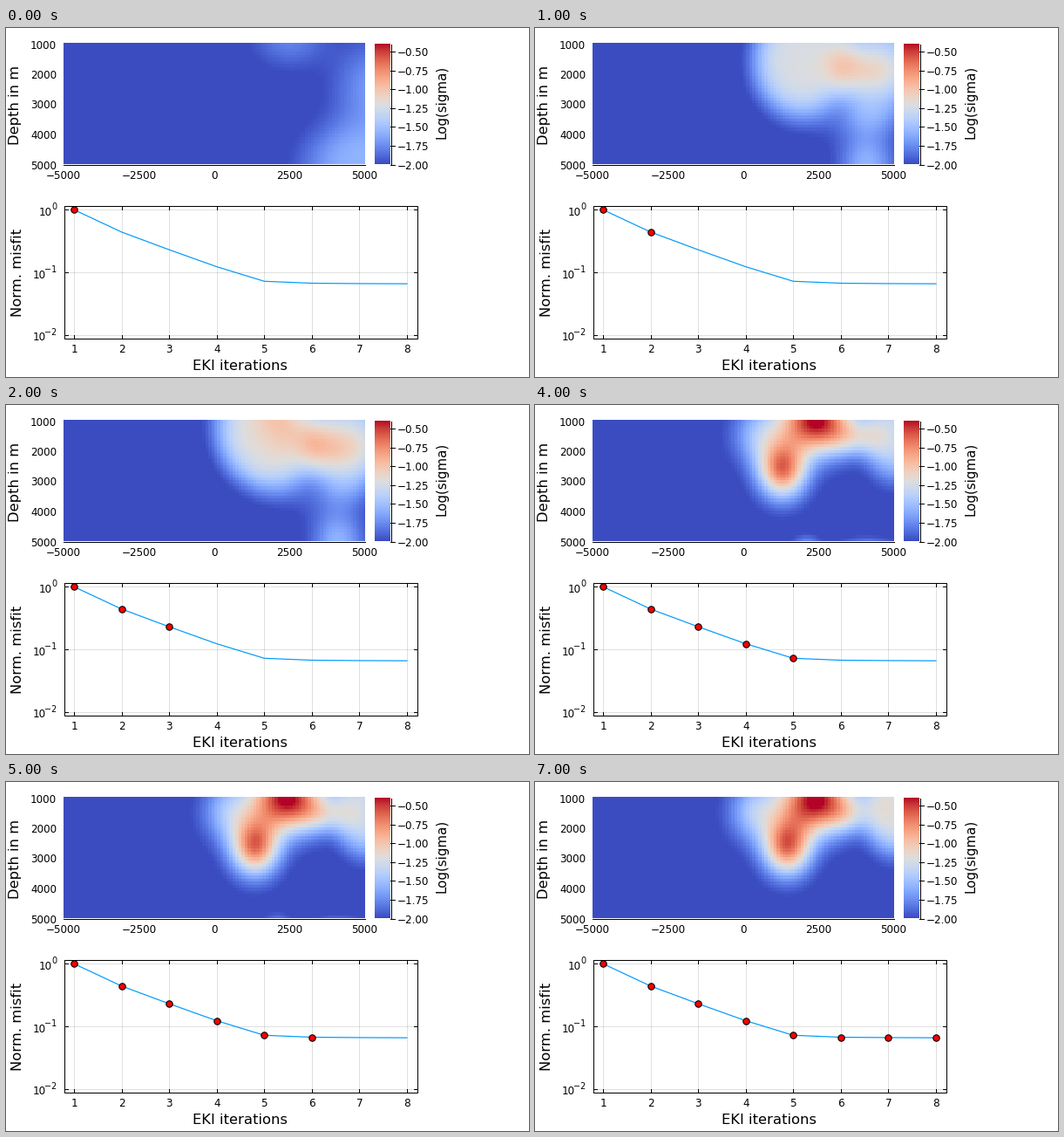
A matplotlib script that plays this animation: 600x400 px, repeating every 8000 ms.

```python
import numpy as np
import matplotlib.pyplot as plt
from matplotlib.animation import FuncAnimation

W, H, DPI = 600, 400, 100
PX = 72 / DPI
plt.rcParams["font.family"] = "DejaVu Sans"

fig = plt.figure(figsize=(W / DPI, H / DPI), dpi=DPI, facecolor="white")
ax = fig.add_axes([0, 0, 1, 1])
ax.axis("off")

X, D = np.meshgrid(np.arange(-4.95, 5, 0.1), np.arange(1.05, 5, 0.1))
FLOOR = 0.04


def blob(height, x, d, sx, sd, power=1, shear=0):
    u, v = X - x - shear * (D - d), D - d
    return height * np.exp(-((u / sx) ** 2 + (v / sd) ** 2) ** power)


def start():
    return (blob(0.17, 2.5, 0.9, 1.2, 0.9) + blob(0.23, 5.3, 2.5, 1.3, 1.5)
            + blob(0.29, 4.7, 5.1, 1.8, 1.5, 1.3))


def early(k):
    """Broad anomaly that spreads left and warms at the top, k from 0 to 1."""
    return (blob(0.52 + 0.03 * k, 1.9 - 0.4 * k, 1.6 - 0.2 * k,
                 1.6 + 0.15 * k, 1.9, 2, 0.25 * k)
            + blob(0.28 * k, 2.2, 0.9, 0.9, 1)
            + blob(0.26, 4.2 - 0.4 * k, 1.9, 1.2, 0.8)
            + blob(0.34 + 0.12 * k, 4.4, 1.7, 1.4, 2 - 0.4 * k, 2)
            + blob(0.3, 4.1, 5, 0.9 - 0.1 * k, 1)
            + blob(0.12 - 0.06 * k, 3.8, 3.6, 1.3, 0.7))


def late(k):
    """Two hot cores; the deep trace fades as k goes from 0 to 1."""
    deep = blob(0.2, 2.1, 5.1, 0.45, 0.3) + blob(0.17, 4.1, 5.1, 0.9, 0.25)
    return (blob(1.05, 2.4, 1 + 0.1 * k, 1.2, 1.1)
            + blob(0.83, 1.3 + 0.15 * k, 2.65, 0.8, 0.95)
            + blob(0.3 + 0.06 * k, 0.5 - 0.1 * k, 1.5, 0.9, 1)
            + blob(0.3 - 0.06 * k, 3.7 - 0.2 * k, 1.6, 0.9 - 0.2 * k, 0.6)
            + blob(0.44 + 0.1 * k, 5, 1.5 - 0.1 * k, 1, 1.5, 1.5)
            + (1 - k) * deep)


def section(step):
    if step == 0:
        field = start()
    elif step < 4:
        field = early((step - 1) / 2)
    else:
        field = late((step - 4) / 3)
    return np.clip(field - FLOOR, 0, 1)


def line(xs, ys, color="black", width=1.0, **kw):
    return ax.plot(xs, ys, color=color, lw=width * PX, **kw)[0]


def label(x, y, text, size=12, ha="center", va="center_baseline", **kw):
    return ax.text(x, y, text, fontsize=size * PX, ha=ha, va=va, **kw)


def number(v, digits=0):
    return f"{v:.{digits}f}".replace("-", "\u2212")


# Upper panel
image = ax.imshow(section(0), cmap="coolwarm", vmin=0, vmax=1, aspect="auto",
                  extent=(66, 411.5, 156.5, 18), interpolation="nearest", zorder=2)
line([66, 412], [156.5, 156.5], zorder=3)
for v in range(-5000, 5001, 2500):
    label(238.7 + v * 0.0345, 168, number(v))
for v in range(1000, 5001, 1000):
    label(58, 18.5 + (v - 1000) * 0.0345, number(v), ha="right")
label(11, 88, "Depth in m", 16.4, va="center", rotation=90)

# Colour bar
ax.imshow(np.linspace(1, 0, 256)[:, None], cmap="coolwarm", aspect="auto",
          extent=(423, 441, 156.5, 18.5))
for v in np.arange(-2, -0.4, 0.25):
    y = 156.5 - (v + 2) * 86.2
    line([441, 446], [y, y])
    label(449, y, number(v, 2), ha="left")
line([441.5, 441.5], [18.5, 156.5])
label(500, 85, "Log(sigma)", 15, va="center", rotation=90)

# Lower panel
L, R, T, B = 66.5, 471.5, 204, 355.8
its = np.arange(1, 9)
xs = 78 + (its - 1) * 54.57
misfit = np.array([0, -0.357, -0.640, -0.912, -1.145, -1.176, -1.182, -1.185])
ys = 208.3 - misfit * 71.6

for n, x in zip(its, xs):
    line([x, x], [T, B], alpha=0.12)
    line([x, x], [B, B - 4])
    line([x, x], [T, T + 4])
    label(x, 367.5, str(n))
for p in range(3):
    y = 208.3 + 71.6 * p
    line([L, R], [y, y], alpha=0.12)
    line([L, L + 4], [y, y])
    line([R, R - 4], [y, y])
    label(46 if p else 53, y + 2, "10", ha="right")
    label(58.5, y - 4, number(-p), 9.6, ha="right")
line([L, R, R, L, L], [T, T, B, B, T])
label(269, 386, "EKI iterations", 16.4)
label(14, 280, "Norm. misfit", 16.4, va="center", rotation=90)

line(xs, ys, "#009AFA", 1.2, zorder=3)
dots = line([], [], ls="none", marker="o", ms=7.4 * PX, mfc="red",
            mec="black", mew=1.1 * PX, zorder=4)

ax.set_xlim(0, W)
ax.set_ylim(H, 0)


def update(step):
    image.set_data(section(step))
    dots.set_data(xs[:step + 1], ys[:step + 1])
    return image, dots


anim = FuncAnimation(fig, update, frames=8, interval=1000, repeat=True,
                     repeat_delay=0, blit=False)
plt.show()
```
